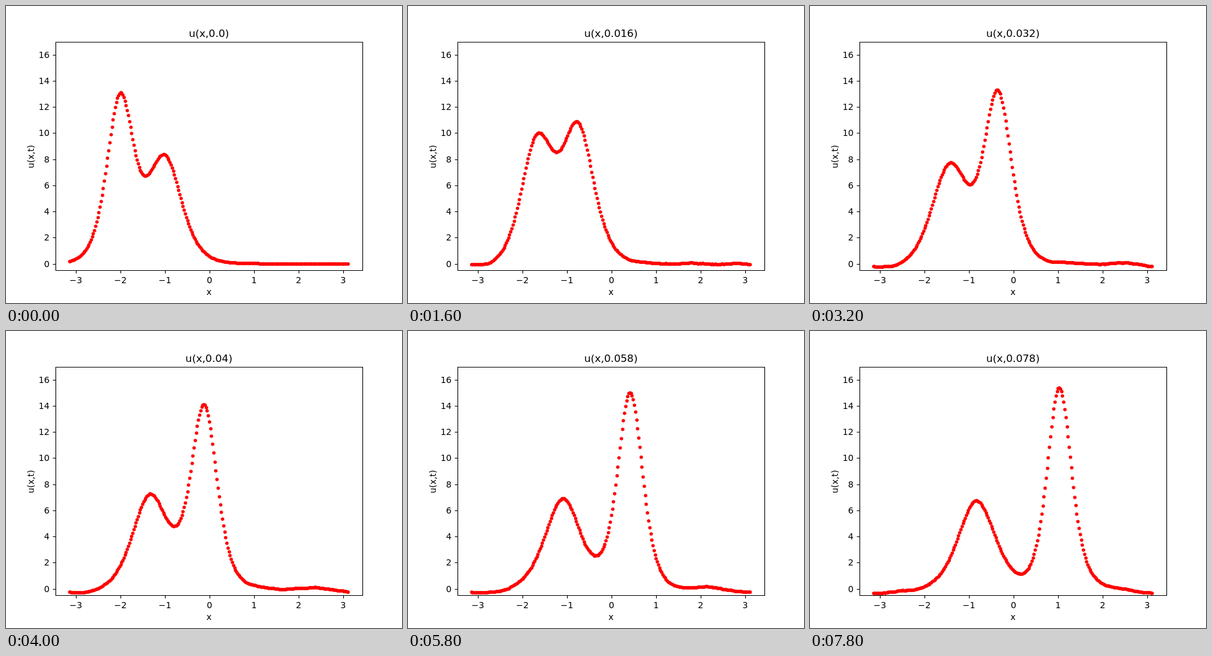
Animation of 640x480 px, one loop 8000 ms. Source, as an HTML page:

```html
<!DOCTYPE html>
<html lang="en">
<head>
<meta charset="utf-8">
<title>Two solitons</title>
<style>
  html, body { margin: 0; width: 100%; height: 100%; overflow: hidden; background: #fff; }
  svg { display: block; width: 640px; height: 480px; }
  text { font: 13.89px "DejaVu Sans", sans-serif; text-anchor: middle; }
  #title { font-size: 16.67px; }
  .lines { fill: none; stroke: #000; stroke-width: 1.11; }
</style>
</head>
<body>
<svg id="plot" viewBox="0 0 640 480"></svg>
<script>
// Korteweg-de Vries equation u_t + 6 u u_x + u_xxx = 0 on [-pi, pi),
// solved pseudo-spectrally with an integrating factor and RK4.
const N = 256;
const FRAME_MS = 200, FRAMES = 40, FRAME_STEP = 0.002;
const STEPS = 200, DT = FRAME_STEP / STEPS;

const range = fn => Array.from({ length: N }, (_, j) => fn(j));
const vector = () => new Float64Array(N);
const cosine = range(j => Math.cos(2 * Math.PI * j / N));
const sine = range(j => Math.sin(2 * Math.PI * j / N));
const waveNumber = range(j => j < N / 2 ? j : j === N / 2 ? 0 : j - N);

function fft(re, im, sign) {
  for (let i = 1, j = 0; i < N; i++) {
    let bit = N >> 1;
    for (; j & bit; bit >>= 1) j ^= bit;
    j ^= bit;
    if (i < j) {
      let swap = re[i]; re[i] = re[j]; re[j] = swap;
      swap = im[i]; im[i] = im[j]; im[j] = swap;
    }
  }
  for (let half = 1; half < N; half *= 2) {
    const stride = N / (2 * half);
    for (let start = 0; start < N; start += 2 * half) {
      for (let m = 0; m < half; m++) {
        const a = start + m, b = a + half;
        const c = cosine[m * stride], s = sign * sine[m * stride];
        const x = re[b] * c - im[b] * s, y = re[b] * s + im[b] * c;
        re[b] = re[a] - x; im[b] = im[a] - y;
        re[a] += x; im[a] += y;
      }
    }
  }
}

const spectrum = { re: vector(), im: vector() };
const stage = { re: vector(), im: vector() };
const work = { re: vector(), im: vector() };
const slope = { re: vector(), im: vector() };
const total = { re: vector(), im: vector() };
const phaseCos = vector(), phaseSin = vector();

// Undo the integrating factor and return to physical space (in work.re).
function toPhysical(w, t) {
  for (let j = 0; j < N; j++) {
    const phase = waveNumber[j] ** 3 * t;
    const c = phaseCos[j] = Math.cos(phase), s = phaseSin[j] = Math.sin(phase);
    work.re[j] = (w.re[j] * c - w.im[j] * s) / N;
    work.im[j] = (w.re[j] * s + w.im[j] * c) / N;
  }
  fft(work.re, work.im, 1);
}

function computeSlope(w, t) {
  toPhysical(w, t);
  for (let j = 0; j < N; j++) {
    work.re[j] *= work.re[j];
    work.im[j] = 0;
  }
  fft(work.re, work.im, -1);
  for (let j = 0; j < N; j++) {
    const a = work.re[j], b = work.im[j], c = phaseCos[j], s = phaseSin[j];
    slope.re[j] = 3 * waveNumber[j] * (b * c - a * s);
    slope.im[j] = -3 * waveNumber[j] * (a * c + b * s);
  }
}

const RK4 = [[0, 1], [0.5, 2], [0.5, 2], [1, 1]];   // [time offset, weight]

function advance(t) {
  total.re.fill(0);
  total.im.fill(0);
  for (const [offset, weight] of RK4) {
    const h = offset * DT;
    for (let j = 0; j < N; j++) {
      stage.re[j] = spectrum.re[j] + h * slope.re[j];
      stage.im[j] = spectrum.im[j] + h * slope.im[j];
    }
    computeSlope(stage, t + h);
    for (let j = 0; j < N; j++) {
      total.re[j] += weight * slope.re[j];
      total.im[j] += weight * slope.im[j];
    }
  }
  for (let j = 0; j < N; j++) {
    spectrum.re[j] += DT / 6 * total.re[j];
    spectrum.im[j] += DT / 6 * total.im[j];
  }
}

const soliton = (speed, d) => speed / 2 / Math.cosh(Math.sqrt(speed) / 2 * d) ** 2;
const profiles = [range(j => {
  const x = -Math.PI + 2 * Math.PI * j / N;
  return soliton(25, x + 2) + soliton(16, x + 1);
})];
spectrum.re.set(profiles[0]);
fft(spectrum.re, spectrum.im, -1);

function profile(index) {
  while (profiles.length <= index) {
    const t = (profiles.length - 1) * FRAME_STEP;
    for (let n = 0; n < STEPS; n++) advance(t + n * DT);
    toPhysical(spectrum, t + FRAME_STEP);
    profiles.push(Array.from(work.re));
  }
  return profiles[index];
}

// Plot
const svg = document.getElementById("plot");
function add(tag, attributes, content = "") {
  const node = document.createElementNS("http://www.w3.org/2000/svg", tag);
  for (const name in attributes) node.setAttribute(name, attributes[name]);
  node.textContent = content;
  return svg.appendChild(node);
}

const SPACING = 496 / 1.1 / (N - 1);
const toX = x => 102.545 + (x + Math.PI) * SPACING * N / (2 * Math.PI);
const toY = u => 416.64 - 21.12 * u;

const dots = range(j => add("circle", { cx: Math.round(102.545 + j * SPACING), r: 2.78, fill: "#f00" }));

let lines = "M80.5 58.5H576.5V427.5H80.5Z";
for (let x = -3; x <= 3; x++) {
  lines += `M${Math.round(toX(x)) + 0.5} 427.5v4.86`;
  add("text", { x: toX(x), y: 448 }, String(x).replace("-", "\u2212"));
}
for (let u = 0; u <= 16; u += 2) {
  const y = Math.round(toY(u));
  lines += `M80.5 ${y + 0.5}h-4.86`;
  add("text", { x: 70.3, y: y + 5, style: "text-anchor:end" }, u);
}
add("path", { d: lines, class: "lines" });
add("text", { x: 328, y: 467 }, "x");
add("text", { transform: "translate(45 243.4) rotate(-90)" }, "u(x,t)");
const title = add("text", { id: "title", x: 328, y: 50 });

let shown = -1;
function draw(now) {
  const index = Math.floor(now / FRAME_MS) % FRAMES;
  if (index !== shown) {
    shown = index;
    const u = profile(index);
    dots.forEach((dot, j) => dot.setAttribute("cy", Math.round(toY(u[j]))));
    title.textContent = `u(x,${index ? Number((index * FRAME_STEP).toFixed(3)) : "0.0"})`;
  }
  requestAnimationFrame(draw);
}
draw(0);
</script>
</body>
</html>
```
